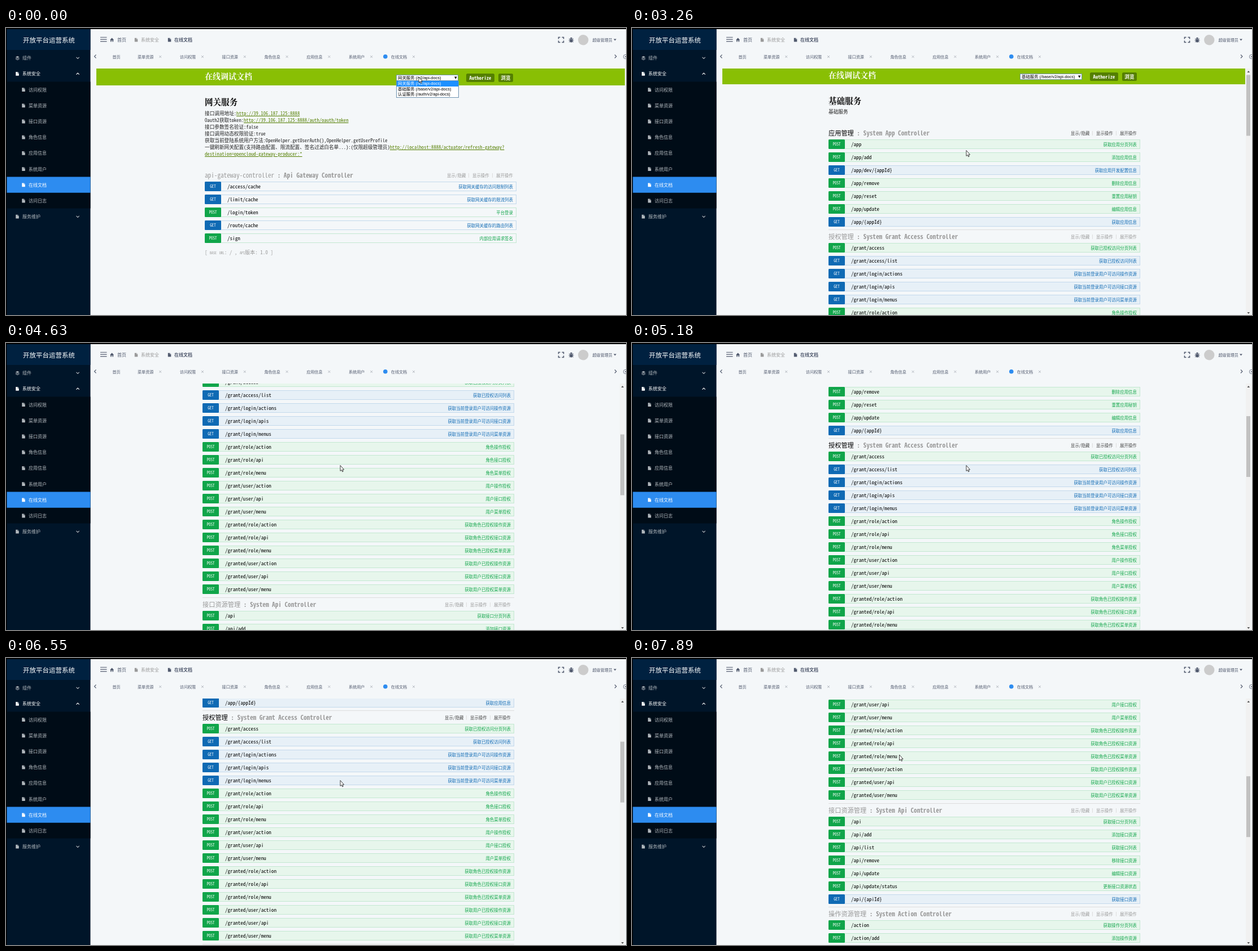
Write an HTML page that moves like this. It is 1098 by 510 pixels and loops after 8000 ms.

```html
<!DOCTYPE html>
<html lang="zh-CN">
<head>
<meta charset="utf-8">
<title>在线文档</title>
<style>
html, body { margin: 0; width: 100%; height: 100%; overflow: hidden; background: #f4f7f9; }
#stage { position: absolute; left: 0; top: 0; width: 1098px; height: 510px; overflow: hidden; background: #f4f7f9;
  font-family: "Noto Sans CJK SC", "Noto Sans CJK", sans-serif; color: #515a6e; }
#stage div, #stage svg { position: absolute; }
.text { white-space: pre; line-height: 20px; }
.mono { font-family: "Noto Sans Mono CJK SC", "Noto Sans Mono CJK JP", "Noto Sans CJK SC", "Noto Sans Mono", monospace; }
.title { font-family: "Noto Serif CJK SC", "Noto Sans CJK SC", serif; font-weight: bold; }
.select, .select .text { font-family: "Liberation Sans", "Noto Sans CJK SC", sans-serif; }
#view { left: 0; top: 0; width: 1098px; height: 510px; clip-path: inset(72px 0 0 150px); }
#scroll { left: 0; top: 0; }
a { color: #547f00; text-decoration: underline; text-underline-offset: 1px; }
small { font-size: inherit; font-variant: small-caps; }
.row { width: 552px; height: 17px; box-sizing: border-box; border: 1px solid; }
.GET { color: #0f6ab4; background: #e7f0f7; border-color: #c3d9ec; }
.POST { color: #10a54a; background: #e7f6ec; border-color: #c3e8d1; }
.pale .row { background: #f4f7f9; }
.badge { left: -1px; top: -1px; width: 29px; height: 17px; border-radius: 1.5px; background: currentColor; }
.badge span { position: absolute; inset: 0; color: #fff; font-size: 7px; line-height: 16.5px; text-align: center; }
.row .text { line-height: 15px; top: 0; }
.path { left: 39px; color: #000; font-size: 9.1px; }
.note { right: 5px; font-size: 7.45px; }
.head { color: #999; font-weight: bold; }
.head b { font-weight: normal; }
.head b, .ops { color: #999; }
.hover .head b { color: #000; }
.hover .ops { color: #444; }
.button { background: #547f00; border-radius: 2.5px; height: 15px; top: 81px; color: #fff; font: bold 8.65px/15px "Noto Sans Mono CJK SC", "Noto Sans Mono", monospace; text-align: center; }
</style>
</head>
<body>
<div id="stage"></div>
<script>
const stage = document.getElementById('stage');

function add(parent, css, cls = '', html = '') {
  const el = document.createElement('div');
  el.className = cls;
  el.style.cssText = css;
  el.innerHTML = html;
  parent.append(el);
  return el;
}
const box = (parent, x, y, w, h, color, extra = '') =>
  add(parent, `left:${x}px;top:${y}px;width:${w}px;height:${h}px;background:${color};${extra}`);
const text = (parent, x, y, size, color, html, cls = '', extra = '') =>
  add(parent, `left:${x}px;top:${y - 10}px;font-size:${size}px;color:${color};${extra}`, 'text ' + cls, html);
function draw(parent, x, y, body) {
  parent.insertAdjacentHTML('beforeend',
    `<svg style="left:0;top:0;overflow:visible" width="1" height="1"><g transform="translate(${x} ${y})">${body}</g></svg>`);
  return parent.lastElementChild;
}
const stroke = (x, y, d, color, width = 1.1) =>
  draw(stage, x, y, `<path d="${d}" fill="none" stroke="${color}" stroke-width="${width}"/>`);
const fill = (x, y, d, color) => draw(stage, x, y, `<path d="${d}" fill="${color}"/>`);
const page = (x, y, color) => fill(x - 2.7, y - 3.3, 'M0 0H3.3V2.4H5.5V6.8H0ZM3.9 0L5.5 1.8H3.9Z', color);

// Document view
const view = add(stage, '');
view.id = 'view';
const bar = box(view, 160, 72, 936, 30, '#89bf04');
const scroller = add(view, '');
scroller.id = 'scroll';
text(scroller, 352, 85, 14, '#fff', '在线调试文档', 'title');
const authorize = add(scroller, 'left:815px;width:50px', 'button', 'Authorize');
add(scroller, 'left:872px;width:26px', 'button', '浏览');
const select = box(scroller, 691, 83, 110, 11, '#fff', 'box-sizing:border-box;border:1px solid #6f93b0');
select.className = 'select';
const chosen = text(select, 2, 4.5, 7.4, '#000', '');
draw(select, 102, 2.5, '<path d="M0 0H4.6L2.3 4.2Z"/>');

function addSection(parent, start, name, title, rows) {
  const y = Math.floor(start), height = rows.length * 23 + 23.5;
  const section = add(parent, '');
  text(section, 352, y, 11.2, '', `<b>${name}</b> : ${title}`, 'mono head');
  [[781, '显示/隐藏'], [826, '显示操作'], [868, '展开操作']].forEach(([x, label]) =>
    text(section, x, y + 1, 7.45, '', label, 'mono ops'));
  for (const x of [819, 861]) box(section, x, y - 3, 1, 8, '#ddd');
  rows.forEach((line, i) => {
    const [verb, path, note] = line.split(' ');
    const kind = verb === 'G' ? 'GET' : 'POST';
    add(section, `left:352px;top:${y + 12 + i * 23}px`, 'row mono ' + kind,
      `<div class="badge"><span>${kind}</span></div><div class="text path">${path}</div><div class="text note">${note}</div>`);
  });
  return { section, top: y - 12, bottom: y - 12 + height, next: start + height };
}

const gateway = add(scroller, '', 'pale');
const base = add(scroller, '');
const title = (parent, label) => text(parent, 352, 131, 14.5, '#000', label, 'title');

title(gateway, '网关服务');
const link = url => `<a>${url}</a>`;
[
  '接口调用地址:' + link('http://39.106.187.125:8888'),
  'Oauth2获取token:' + link('http://39.106.187.125:8888/auth/oauth/token'),
  '接口参数签名验证:false',
  '接口调用动态权限验证:true',
  '获取当前登陆系统用户方法:OpenHelper.getUserAuth(),OpenHelper.getUserProfile',
  '一键刷新网关配置(支持路由配置、限流配置、签名过滤白名单...):(仅限超级管理员)' +
    link('http://localhost:8888/actuator/refresh-gateway?'),
  link('destination=opencloud-gateway-producer:*')
].forEach((line, i) => text(gateway, 352, 151 + i * 12.05, 8.65, '#222', line, 'mono'));
addSection(gateway, 261, 'api-gateway-controller', 'Api Gateway Controller', [
  'G /access/cache 获取网关缓存的访问限制列表',
  'G /limit/cache 获取网关缓存的限流列表',
  'P /login/token 平台登录',
  'G /route/cache 获取网关缓存的路由列表',
  'P /sign 内部应用请求签名'
]);
text(gateway, 352, 398, 9.1, '#999',
  '[ <small>base url</small>: / , <small>api</small>版本: 1.0 ]', 'mono');

title(base, '基础服务');
text(base, 352, 150, 8.65, '#222', '基础服务', 'mono');
const targets = [['action', '操作'], ['api', '接口'], ['menu', '菜单']];
const trio = (prefix, note) => targets.map(([path, name]) => `P ${prefix}/${path} ${note(name)}`);
const groups = [
  ['应用管理', 'System App Controller', [
    'P /app 获取应用分页列表', 'P /app/add 添加应用信息', 'G /app/dev/{appId} 获取应用开发配置信息',
    'P /app/remove 删除应用信息', 'P /app/reset 重置应用秘钥', 'P /app/update 编辑应用信息',
    'G /app/{appId} 获取应用信息']],
  ['授权管理', 'System Grant Access Controller', [
    'P /grant/access 获取已授权访问分页列表', 'G /grant/access/list 获取已授权访问列表',
    ...targets.map(([path, name]) => `G /grant/login/${path}s 获取当前登录用户可访问${name}资源`),
    ...trio('/grant/role', name => `角色${name}授权`),
    ...trio('/grant/user', name => `用户${name}授权`),
    ...trio('/granted/role', name => `获取角色已授权${name}资源`),
    ...trio('/granted/user', name => `获取用户已授权${name}资源`)]],
  ['接口资源管理', 'System Api Controller', [
    'P /api 获取接口分页列表', 'P /api/add 添加接口资源', 'P /api/list 获取接口列表',
    'P /api/remove 移除接口资源', 'P /api/update 编辑接口资源',
    'P /api/update/status 更新接口资源状态', 'G /api/{apiId} 获取接口资源']],
  ['操作资源管理', 'System Action Controller', [
    'P /action 获取操作分页列表', 'P /action/add 添加操作资源']]
];
let nextY = 188;
const sections = groups.map(([name, label, rows], i) => {
  if (i) box(base, 352, Math.floor(nextY) - 12, 552, 1, '#ddd');
  const entry = addSection(base, nextY, name, label, rows);
  nextY = entry.next;
  return entry;
});

const fetching = text(view, 442, 113, 9.16, '#222',
  'fetching resource list: http://39.106.187.125:8888/base/v2/api-docs; Please wait.', 'mono');

const services = ['网关服务 (/v2/api-docs)', '基础服务 (/base/v2/api-docs)', '认证服务 (/auth/v2/api-docs)'];
const menu = box(view, 691, 94, 111, 30, '#fff', 'box-sizing:border-box;border:1px solid #6f93b0;border-top:0');
menu.className = 'select';
const options = services.map((name, i) => {
  const option = box(menu, 0, i * 9.8, 109, 9.8, '#fff');
  text(option, 2, 4.8, 7.4, 'inherit', name);
  return option;
});

const scrollbar = box(view, 1087, 72, 9, 438, '#f1f1f1');
draw(scrollbar, 2.5, 4, '<path d="M0 3H4.6L2.3 0Z M0 429H4.6L2.3 432Z" fill="#505050"/>');
const thumb = box(scrollbar, 1, 10.5, 7, 108, '#c1c1c1');

// Sidebar
box(stage, 0, 0, 1098, 2, '#000');
box(stage, 0, 0, 2, 510, '#000');
const panel = (y, height, color) => fill(1.5, y, `M0 0H148V${height}H0Z`, color);
panel(2, 508, '#001529');
panel(2, 37, '#002140');
panel(95.5, 225, '#000c17');
panel(264.5, 28.2, '#2d8cf0');
text(stage, 30, 20.5, 11.5, '#fff', '开放平台运营系统');
const dim = '#b4babf';
fill(17, 50, 'M0 1.6L3.3 0L6.6 1.6L3.3 3.2ZM0 3L3.3 4.6L6.6 3V4L3.3 5.6L0 4ZM0 4.8L3.3 6.4L6.6 4.8V5.6L3.3 7.2L0 5.6Z', dim);
[[53, '组件', dim], [81.3, '系统安全', '#fff'], [335, '服务维护', dim]].forEach(([y, label, color], i) => {
  if (i) page(20, y, color);
  text(stage, 29, y, 8, color, label, '', 'font-weight:500');
  stroke(124.5, y - 1.2, i === 1 ? 'M0 2.6L2.6 0L5.2 2.6' : 'M0 0L2.6 2.6L5.2 0', color);
});
['访问权限', '菜单资源', '接口资源', '角色信息', '应用信息', '系统用户', '在线文档', '访问日志'].forEach((label, i) => {
  const y = 109.5 + i * 28.2, color = i === 6 ? '#fff' : dim;
  page(31, y, color);
  text(stage, 40, y, 8, color, label, '', 'font-weight:500');
});

// Top bar and tabs
stroke(167, 16.5, 'M0 0H11.5M0 3.7H11.5M0 7.4H11.5', '#515a6e', 1.2);
fill(184, 17.5, 'M0 3.7L3.6 0L7.2 3.7H6.1V7H4.4V4.6H2.8V7H1.1V3.7Z', '#515a6e');
text(stage, 197, 20.5, 8, '#515a6e', '首页');
page(230.5, 21, '#999');
text(stage, 239, 20.5, 8, '#999', '系统安全');
page(289.5, 21, '#515a6e');
text(stage, 298, 20.5, 8, '#515a6e', '在线文档', '', 'font-weight:bold');
stroke(978.5, 16.5, 'M0 3V0H3M6 0H9V3M9 6V9H6M3 9H0V6', '#515a6e', 1.6);
fill(996.5, 16.5, 'M2.5 2.4A2 2.2 0 0 1 6.5 2.4ZM2 3H7V6.5A2.5 2.6 0 0 1 2 6.5Z', '#515a6e');
stroke(996.5, 16.5, 'M0.5 2.2L2.2 3.6M8.5 2.2L6.8 3.6M0 5.4H9M.6 8.6L2.5 7M8.4 8.6L6.5 7', '#515a6e', 1);
draw(stage, 1022.3, 21.2, '<circle r="9.2" fill="#ccc"/>');
text(stage, 1038.5, 20.5, 7.1, '#515a6e', '超级管理员');
fill(1076, 19.5, 'M0 0H5L2.5 3Z', '#515a6e');

stroke(156.5, 47.5, 'M3 0L0 3L3 6', '#515a6e');
stroke(1078, 47.5, 'M0 0L3 3L0 6', '#515a6e');
draw(stage, 1097, 51, '<circle r="3.7" fill="none" stroke="#808695"/><path d="M-1.4 -1.4L1.4 1.4M1.4 -1.4L-1.4 1.4" stroke="#808695"/>');
text(stage, 188.5, 50.5, 7.1, '#515a6e', '首页');
['菜单资源', '访问权限', '接口资源', '角色信息', '应用信息', '系统用户', '在线文档'].forEach((label, i) => {
  const x = 233 + i * 74.8;
  text(stage, x, 50.5, 7.1, '#515a6e', label);
  stroke(x + 38.2, 49, 'M0 0L4 4M4 0L0 4', '#a8adb5', .8);
});
draw(stage, 671.8, 50.7, '<circle r="3.8" fill="#2d8cf0"/>');

const arrow = draw(stage, 0, 0,
  '<path d="M0 0V10L2.2 8L3.7 11.3L5.2 10.6L3.8 7.5H6.6Z" fill="#fff" stroke="#111" stroke-width=".8"/>');
const beam = draw(stage, 734, 110,
  '<path d="M-2 -5H2M0 -5V5M-2 5H2" fill="none" stroke="#222" stroke-width=".9"/>');

// Each list holds [time, value...]; a value stays until the next time.
const pointer = [
  [0, 731, 87], [160, 732, 92], [290, 733, 99], [410, 734, 105], [540, 734, 109],
  [2260, 728, 116], [2400, 700, 138], [2540, 664, 168], [2680, 630, 194], [2820, 607, 210],
  [2980, 595, 217], [3120, 592, 217.5], [7740, 540, 199], [7890, 473.5, 172]
];
const scrolls = [
  [0, 0], [3260, 2], [3380, 62], [3510, 150], [3650, 196], [3930, 222], [4070, 327],
  [4630, 323], [4750, 236], [4900, 196], [5180, 191], [5330, 140], [5450, 85], [5570, 65],
  [6000, 78], [6120, 190], [6250, 262], [6550, 267], [6710, 393],
  [7010, 398], [7150, 440], [7310, 458], [7600, 463], [7740, 500], [7890, 517]
];
const at = (list, time) => list.findLast(entry => entry[0] <= time);
const show = (el, visible) => { el.style.display = visible ? '' : 'none'; };

function render(now) {
  const time = now % 8000;
  const [, x, y] = at(pointer, time);
  const offset = at(scrolls, time)[1];
  const open = time < 970, loaded = time >= 2260, typing = time >= 1120 && !loaded;

  show(gateway, open);
  show(menu, open);
  show(fetching, !open && !loaded);
  show(authorize, open || loaded);
  show(base, loaded);
  show(scrollbar, loaded);
  show(arrow, !typing);
  show(beam, typing);

  chosen.textContent = services[open ? 0 : 1];
  const active = time < 290 ? 0 : 1;
  options.forEach((option, i) => {
    option.style.background = i === active ? '#1e90ff' : '#fff';
    option.style.color = i === active ? '#fff' : '#000';
  });

  bar.style.width = (loaded ? 926 : 936) + 'px';
  bar.style.transform = `translateY(${-offset}px)`;
  scroller.style.transform = `translate(${loaded ? -4 : 0}px, ${-offset}px)`;
  thumb.style.transform = `translateY(${offset * .246}px)`;
  arrow.style.transform = `translate(${x}px, ${y}px)`;
  for (const { section, top, bottom } of sections) {
    section.classList.toggle('hover', y + offset >= top && y + offset < bottom);
  }
  requestAnimationFrame(render);
}
requestAnimationFrame(render);
</script>
</body>
</html>
```
